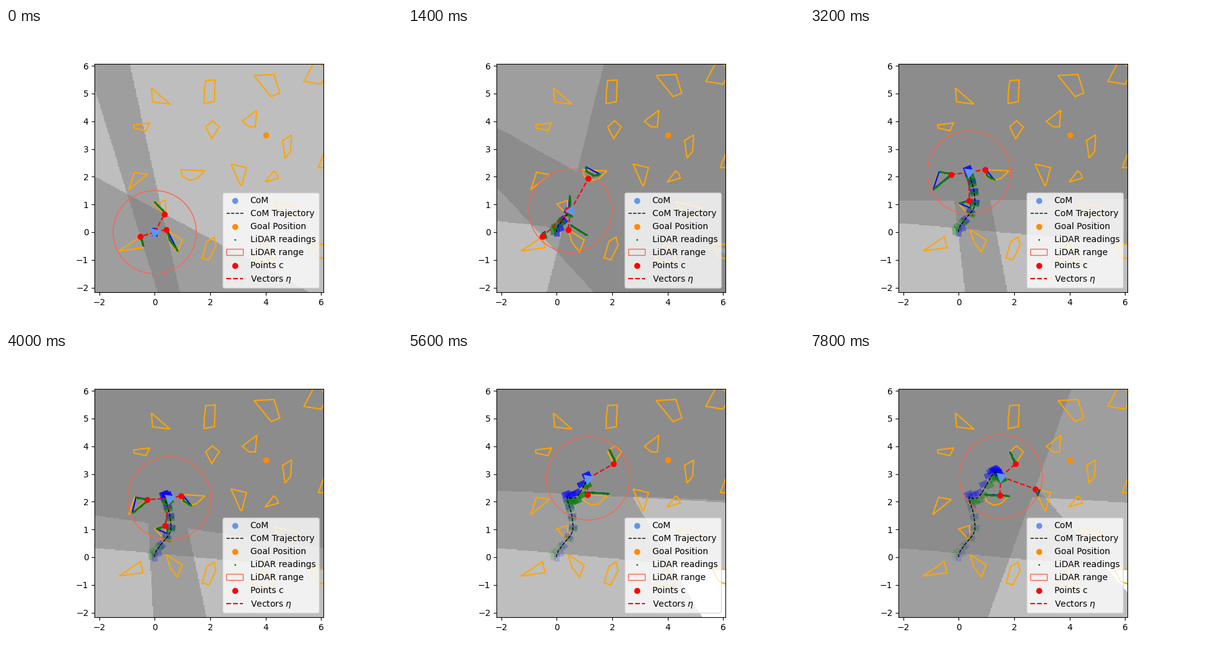
These frames come from a looping animation (640x480 px, 8 s). A matplotlib script:

```python
import numpy as np
import matplotlib.pyplot as plt
from matplotlib.animation import FuncAnimation
from matplotlib.patches import Circle, Polygon, Rectangle
from matplotlib.transforms import Affine2D

FRAMES, STEP_MS = 40, 200
RANGE = 1.5
DETECT = .97 * RANGE
LOW, HIGH = -2.17, 6.08
SHADES = np.array([255, 190, 158, 140], dtype=np.uint8)

# Obstacles along the route; the order decides which constraint slot each one takes
NEAR = [
    [(-1.29, -.68), (-.52, -.16), (-.42, -.56)],
    [(0, 1.02), (.38, 1.14), (.4, .85), (.35, .65)],
    [(-.94, 1.53), (-.73, 2.16), (-.27, 2.08)],
    [(1.84, 3.8), (2.08, 4.02), (2.33, 3.8), (2.05, 3.37)],
    [(.94, 2.26), (1.81, 2.21), (1.51, 1.93), (1.26, 1.87), (.99, 2.02)],
    [(2.75, 2.46), (3.31, 2.33), (3.14, 1.68), (3.09, 1.7)],
    [(.41, .09), (.99, -.28), (.82, -.72), (.55, -.36)],
]
FAR = [
    [(-.12, 5.2), (.55, 4.62), (-.08, 4.7)],
    [(1.78, 4.64), (2.15, 4.71), (2.18, 5.49), (1.84, 5.47), (1.79, 5.06)],
    [(3.58, 5.65), (4.3, 5.69), (4.51, 5.02), (4.2, 4.89)],
    [(5.38, 5.44), (5.73, 6.1), (5.95, 6.12), (6.25, 5.8), (6.0, 5.34)],
    [(-.76, 3.87), (-.19, 3.94), (-.32, 3.66), (-.75, 3.76)],
    [(3.16, 4.0), (3.68, 4.4), (3.63, 3.8), (3.4, 3.8)],
    [(4.61, 3.31), (4.94, 3.51), (4.9, 2.91), (4.7, 2.67)],
    [(5.9, 2.33), (6.12, 2.9), (6.4, 2.33)],
    [(3.98, 1.81), (4.29, 2.21), (4.4, 2.12), (4.46, 1.95)],
    [(1.71, -.93), (1.88, -.33), (2.14, -.18), (2.21, -.48), (1.95, -1.0)],
    [(4.3, 1.1), (5.22, .88), (5.0, .55), (4.5, .75)],
    [(3.52, -1.0), (3.95, -.35), (4.35, -1.12)],
    [(5.6, -.42), (6.3, -.45), (6.2, -1.0), (5.85, -.88)],
]

# Waypoints of the centre of mass: step, x, y
WAY = np.array([(0, 0, 0), (2, .01, .14), (5, .24, .48), (8, .58, .95),
                (10, .565, 1.35), (16, .37, 2.155), (20, .52, 2.12),
                (24, .76, 2.215), (28, 1.13, 2.84), (31, 1.26, 3.03),
                (39, 1.52, 2.91)])


def com(k):
    """Cubic Hermite curve through the waypoints."""
    t, pts = WAY[:, 0], WAY[:, 1:]
    slope = np.gradient(pts, t, axis=0)
    i = min(np.searchsorted(t, k, side="right"), len(t) - 1) - 1
    h = t[i + 1] - t[i]
    u = min((k - t[i]) / h, 1)
    ease = u * u * (3 - 2 * u)
    return (pts[i] + ease * (pts[i + 1] - pts[i])
            + h * u * (1 - u) * ((1 - u) * slope[i] - u * slope[i + 1]))


def turn(k):
    """The body turns quickly at first, then holds its direction (degrees)."""
    return 90 + 115 * (1 - np.exp(-(k / 7) ** 1.5))


def edges(poly):
    poly = np.array(poly, float)
    return zip(poly, np.roll(poly, -1, axis=0) - poly)


def nearest(poly, eye):
    hits = [p + np.clip((eye - p) @ e / (e @ e), 0, 1) * e for p, e in edges(poly)]
    return min(hits, key=lambda c: np.hypot(*(c - eye)))


def sensed(k):
    """Obstacles in range, each with its point nearest to the robot."""
    eye = com(k)
    found = [(poly, nearest(poly, eye)) for poly in NEAR]
    return [(poly, c) for poly, c in found if np.hypot(*(c - eye)) < DETECT]


def shading(k):
    """Overlay of half-planes; a slot with no new obstacle keeps its last one."""
    slots = {}
    for m in range(k + 1):
        planes = [(c, c - com(m)) for _, c in sensed(m)]
        slots.update(enumerate(planes[:4]))
    axis = LOW + (np.arange(250) + .5) * (HIGH - LOW) / 250
    gx, gy = np.meshgrid(axis, axis)
    count = np.zeros(gx.shape, int)
    for c, eta in slots.values():
        count += (gx - c[0]) * eta[0] + (gy - c[1]) * eta[1] <= 0
    return np.repeat(SHADES[np.minimum(count, 3)][..., None], 3, axis=2)


def scan(poly, eye):
    """Points on the sides that face the robot, sorted by bearing."""
    mid = np.mean(poly, axis=0)
    parts = [np.empty((0, 2))]
    for p, e in edges(poly):
        n = np.array([e[1], -e[0]])
        if n @ (p - mid) < 0:
            n = -n
        if n @ (eye - p) > 0:
            s = np.linspace(0, 1, int(np.hypot(*e) / .025) + 2)
            parts.append(p + s[:, None] * e)
    pts = np.concatenate(parts)
    d = pts - eye
    keep = np.hypot(*d.T) < RANGE
    pts, d = pts[keep], d[keep]
    f = mid - eye
    bearing = np.arctan2(f[0] * d[:, 1] - f[1] * d[:, 0], d @ f)
    return pts[np.argsort(bearing, kind="stable")]


def foot(k, now):
    """Left and right feet alternate on either side of the body axis."""
    side = 1 if k % 2 == 0 else -1
    a = np.radians(turn(k) - 90)
    x, y = com(k) + side * .13 * min(k, 1) * np.array([np.cos(a), np.sin(a)])
    spin = Affine2D().rotate_deg_around(x, y, turn(k))
    return Rectangle((x - .15, y - .1), .3, .2, lw=0, fc="blue" if side > 0 else "green",
                     alpha=max(.12, .85 * .94 ** (now - k)), zorder=3,
                     transform=spin + ax.transData)


fig, ax = plt.subplots(figsize=(6.4, 4.8), dpi=100)
ax.set_aspect("equal")
ax.set(xlim=(LOW, HIGH), ylim=(LOW, HIGH), xticks=range(-2, 7, 2), yticks=range(-2, 7))
ground = ax.imshow(shading(0), extent=(LOW, HIGH, LOW, HIGH), origin="lower",
                   interpolation="nearest", zorder=0)
for shape in NEAR + FAR:
    ax.add_patch(Polygon(shape, fill=False, ec="orange", lw=1.5, zorder=2))
goal = ax.scatter(4, 3.5, color="darkorange", zorder=4, label="Goal Position")
ring = ax.add_patch(Circle((0, 0), RANGE, fill=False, ec="tomato", lw=1, zorder=4))
trail, = ax.plot([], [], "k--", lw=1, zorder=4, label="CoM Trajectory")

handles = [
    ax.scatter([], [], color="cornflowerblue", label="CoM"),
    trail,
    goal,
    ax.scatter([], [], s=1, color="green", label="LiDAR readings"),
    Rectangle((0, 0), 1, 1, fill=False, ec="tomato", lw=1, label="LiDAR range"),
    ax.scatter([], [], color="red", label="Points c"),
    plt.Line2D([], [], color="red", ls="--", label=r"Vectors $\eta$"),
]
ax.legend(handles=handles, loc="lower right").set_zorder(10)

moving = []


def draw(k):
    while moving:
        moving.pop().remove()
    here = com(k)
    drift = com(k + 1) - here
    ground.set_data(shading(k))
    ring.center = here
    trail.set_data(*np.array([com(m) for m in range(k + 1)]).T)
    for m in range(k + 1):
        moving.append(ax.add_patch(foot(m, k)))
    rng = np.random.default_rng(k)
    for poly, c in sensed(k):
        pts = scan(poly, here)
        if len(pts):
            pts = pts + drift
            moving.append(ax.add_patch(Polygon(pts, fill=False, ec="blue", lw=1.5, zorder=5)))
            pts = pts + rng.normal(0, .008, pts.shape)
            moving.append(ax.scatter(*pts.T, s=1, color="green", zorder=6))
        moving.extend(ax.plot(*np.array([here, c]).T, "r--", zorder=6))
        moving.append(ax.scatter(*c, color="red", zorder=7))
    moving.extend(ax.plot(*here, marker=(3, 0, 15 - turn(k)), ms=15, mew=0,
                          color="cornflowerblue", zorder=8))
    return moving


anim = FuncAnimation(fig, draw, frames=FRAMES, interval=STEP_MS,
                     init_func=lambda: draw(0), repeat=True, repeat_delay=0)
plt.show()
```
